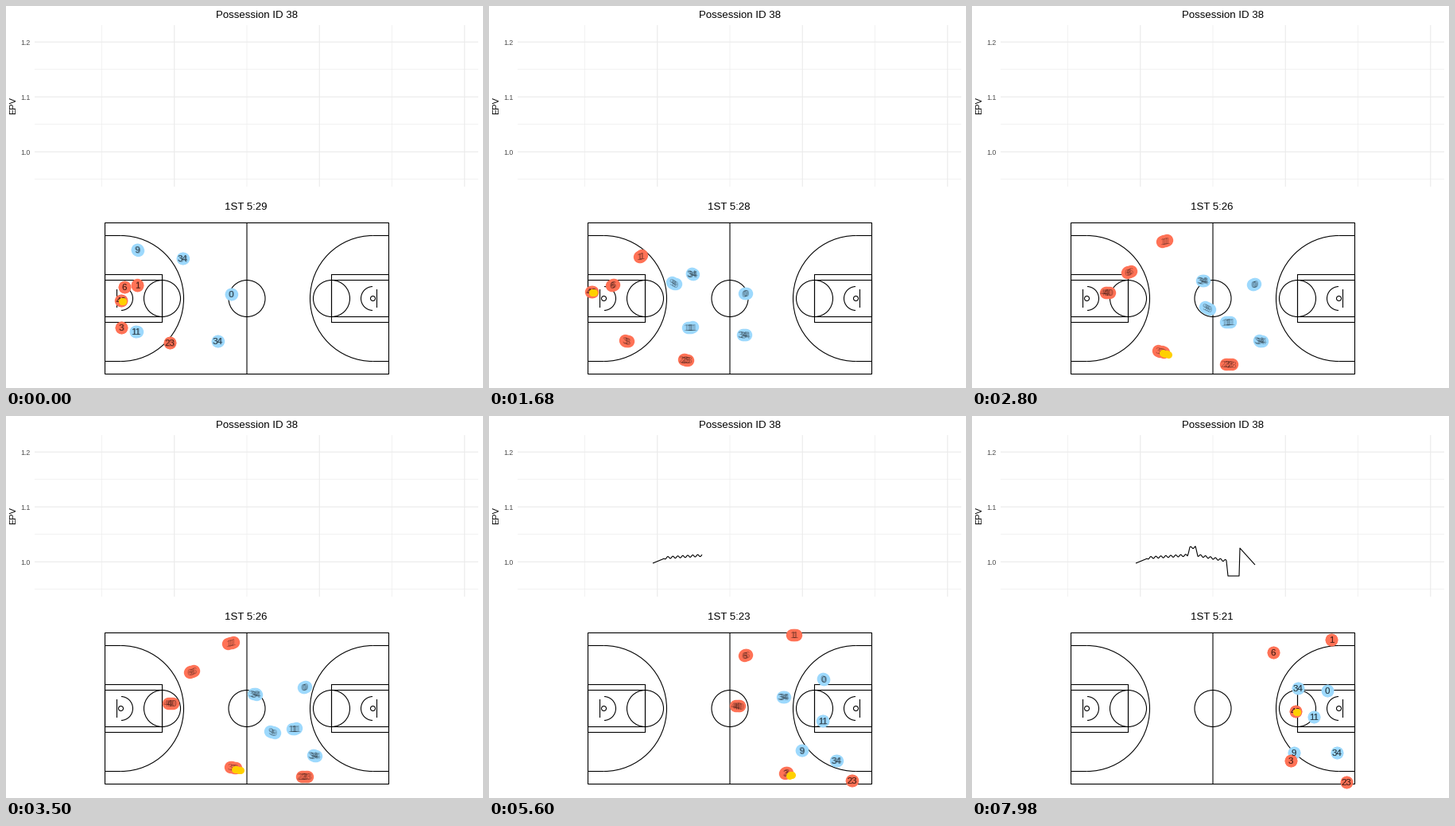
These frames come from a looping animation (600 px wide and 480 px high, 8 s). A matplotlib script:

```python
import numpy as np
import matplotlib.pyplot as plt
from matplotlib.animation import FuncAnimation
from matplotlib.patches import Arc, Circle, Rectangle

W, H, DPI = 600, 480, 100
PT = 72 / DPI
INTERVAL, FRAMES = 40, 200
STEP_MS, LAST_STEP = 140, 57
RED, BLUE, GOLD = "#ff7256", "#9dd9fd", "#ffd000"

plt.rcParams["font.family"] = "Liberation Sans"
fig = plt.figure(figsize=(W / DPI, H / DPI), dpi=DPI, facecolor="white")
ax = fig.add_axes([0, 0, 1, 1])
ax.set_xlim(0, W)
ax.set_ylim(H, 0)
ax.axis("off")


def line(xs, ys, color="black", width=1.1, z=2):
    return ax.plot(xs, ys, color=color, lw=width * PT, zorder=z, snap=False,
                   solid_capstyle="butt", solid_joinstyle="round")[0]


def label(x, y, text, size, color="black", ha="center", va="baseline", **kw):
    return ax.text(x, y, text, fontsize=size * PT, color=color,
                   ha=ha, va=va, **kw)


# --- chart ---
def draw_chart():
    grid, gap_x, gap_y = "#ebebeb", 91.25, 34.5
    for i in range(6):
        width = 1.1 if i % 2 else 0.6
        x, y = 120.5 + i * gap_x, 217.7 - i * gap_y
        line([x, x], [24, 227], grid, width, 0)
        line([36, 594], [y, y], grid, width, 0)
        if i % 2:
            label(31, y + 3.4, f"{0.95 + 0.05 * i:.1f}", 8.8, "#4d4d4d", "right")
    label(315, 15, "Possession ID 38", 13.2)
    label(9.5, 125.5, "EPV", 11, rotation=90, va="center")


# --- court ---
CX, CY = 303, 367.5
END, PAINT, RIM, BOARD = 178.5, 106.5, 158.5, 163.5   # distances from CX


def outline(patch):
    patch.set(fill=False, edgecolor="black", linewidth=1.1 * PT, zorder=2,
              snap=False)
    ax.add_patch(patch)


def draw_half(side):
    """side is -1 for the left half, 1 for the right half."""
    def fx(d):
        return CX + side * d

    def arc(d, r, spread):
        mid = 180 if side > 0 else 0
        outline(Arc((fx(d), CY), 2 * r, 2 * r, theta1=mid - spread,
                    theta2=mid + spread))

    arc(RIM, 79, 90)
    for dy in (-79, 79):
        line([fx(END), fx(RIM)], [CY + dy] * 2)
    for dy in (30, 23):
        line([fx(END), fx(PAINT), fx(PAINT), fx(END), fx(END)],
             [CY - dy, CY - dy, CY + dy, CY + dy, CY - dy])
    outline(Circle((fx(PAINT), CY), 23))
    outline(Circle((fx(RIM), CY), 3))
    arc(RIM, 15, 88)
    line([fx(BOARD)] * 2, [CY - 11.5, CY + 11.5])


draw_chart()
outline(Rectangle((CX - END, CY - 95), 2 * END, 190))
line([CX, CX], [CY - 95, CY + 95])
outline(Circle((CX, CY), 23))
draw_half(-1)
draw_half(1)

# --- movement: each player passes four points at shared moments ---
KEYS = np.array([0.0, 8, 36, LAST_STEP])
RED_TEAM = [
    ("1", (165, 351), (176, 324), (361, 274), (452, 281)),
    ("6", (149, 353), (149, 353), (304, 302), (379, 297)),
    ("40", (145, 370), (123, 359), (286, 363), (407, 371)),
    ("3", (145, 404), (156, 415), (362, 450), (401, 433)),
    ("23", (206, 423), (225, 441), (450, 457), (471, 460)),
]
BLUE_TEAM = [
    ("9", (165, 306), (206, 334), (388, 419), (405, 423)),
    ("34", (222, 317), (242, 332), (357, 354), (410, 342)),
    ("0", (283, 362), (308, 363), (411, 329), (447, 345)),
    ("11", (163, 409), (222, 406), (415, 385), (430, 378)),
    ("34", (266, 421), (302, 412), (428, 434), (459, 423)),
]
# every step shows four successive positions at once
TRAIL = np.array([-0.375, -0.125, 0.125, 0.375])
times = np.clip(np.arange(LAST_STEP + 1)[:, None] + TRAIL, 0, LAST_STEP)


def smooth(vals):
    """Monotone cubic through the key moments, coming to rest at the end."""
    v, h = np.array(vals, float), np.diff(KEYS)
    d = np.diff(v) / h
    prod = d[:-1] * d[1:]
    turn = prod <= 0
    inner = np.where(turn, 0, 2 * prod / np.where(turn, 1, d[:-1] + d[1:]))
    m = np.concatenate([[d[0] / 2], inner, [0]])
    i = np.clip(np.searchsorted(KEYS, times, side="right") - 1, 0, len(h) - 1)
    s = (times - KEYS[i]) / h[i]
    ease = s * s * (3 - 2 * s)
    return (v[i] + (v[i + 1] - v[i]) * ease
            + h[i] * s * (1 - s) * (m[i] * (1 - s) - m[i + 1] * s))


def path(points):
    return np.stack([smooth(axis) for axis in zip(*points)], axis=-1)


def ramp(start, stop):
    return np.clip((times - start) / (stop - start), 0, 1)[..., None]


def ball_path(big, guard):
    """Inbound pass from big to guard, a dribble, then a pass back."""
    inbound, back = ramp(12.5, 19.3), ramp(50.4, 53.2)
    held = inbound - back
    bow = 4 * inbound * (1 - inbound) * np.array([14, -15])
    hand = np.array([1.5, 1]) + held * np.array([4.5, 2])
    return big + (guard - big) * held + bow + hand


def dots(diameter, color, z):
    return ax.scatter([], [], s=(diameter * PT) ** 2, c=color,
                      linewidths=0, zorder=z)


players, tracks = [], {}
for team, color, z in ((BLUE_TEAM, BLUE, 4), (RED_TEAM, RED, 5)):
    for number, *points in team:
        tags = [label(0, 0, number, 11.5, alpha=0.28, zorder=6) for _ in TRAIL]
        tracks[number] = path(points)
        players.append((tracks[number], dots(15.4, color, z), tags))
ball_track = ball_path(tracks["40"], tracks["3"])
ball = dots(9, GOLD, 7)

# --- value curve: a few levels with a small ripple ---
LEVELS = [(206, 185), (223, 178), (271, 175), (274, 165.5), (281, 165),
          (284, 175), (320, 182), (322, 201), (336, 201), (337, 166), (356, 187)]
EPV_START = 28
epv_x = np.arange(206, 356.5, 0.5)
epv_y = np.interp(epv_x, *zip(*LEVELS))
rippled = (epv_x > 220) & (epv_x < 320)
epv_y -= 1.3 * rippled * np.cos(2 * np.pi * (epv_x - 225) / 6.25)
curve = line([], [], z=3)
clock = label(301.5, 255.5, "", 13.2)


def update(frame):
    n = min(LAST_STEP, (frame * INTERVAL + INTERVAL - 1) // STEP_MS)
    for track, marks, tags in players:
        marks.set_offsets(track[n])
        for tag, (x, y) in zip(tags, track[n]):
            tag.set_position((x, y + 4.2))
    ball.set_offsets(ball_track[n])

    grown = max(0, n - EPV_START) / (LAST_STEP - EPV_START)
    shown = round(grown * len(epv_x))
    curve.set_data(epv_x[:shown], epv_y[:shown])

    left = int(329.85 - 0.15 * n)
    clock.set_text(f"1ST {left // 60}:{left % 60:02d}")
    return []


anim = FuncAnimation(fig, update, frames=FRAMES, interval=INTERVAL,
                     repeat=True, repeat_delay=0, blit=False)
plt.show()
```
